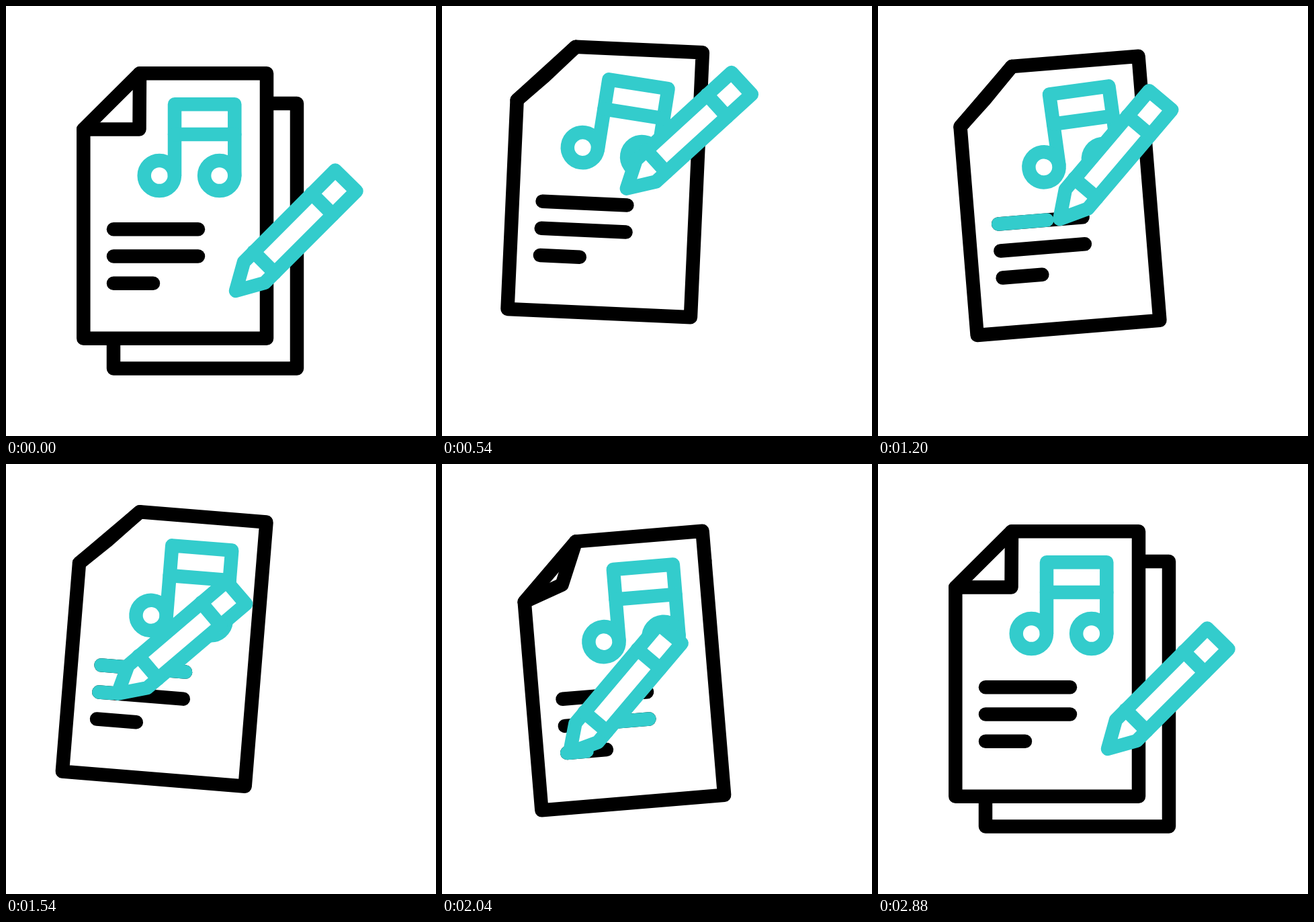
Animation of 640 by 640 pixels, one loop 3.34 s. Source, as an HTML page with a canvas:

```html
<!DOCTYPE html>
<html lang="en">
<head>
<meta charset="utf-8">
<title>Songwriting</title>
<style>
html, body { margin: 0; width: 100%; height: 100%; overflow: hidden; background: #fff; }
canvas { display: block; width: 640px; height: 640px; }
</style>
</head>
<body>
<canvas id="stage" width="640" height="640"></canvas>
<script>
const ctx = document.getElementById('stage').getContext('2d');
const LOOP = 3340, STEP = 20;
const INK = '#000', TEAL = '#33cccc', PAPER = '#fff';

const clamp = v => Math.max(0, Math.min(1, v));
const lerp = (a, b, k) => a + (b - a) * k;
const ease = k => (1 - Math.cos(Math.PI * clamp(k))) / 2;
const span = (t, from, to) => clamp((t - from) / (to - from));
const mix = (a, b, k) => a.map((v, i) => lerp(v, b[i], k));

// Eased value between [time, value] keys.
function track(t, keys) {
  if (t <= keys[0][0]) return keys[0][1];
  for (let i = 1; i < keys.length; i++) {
    const [t0, v0] = keys[i - 1], [t1, v1] = keys[i];
    if (t < t1) return lerp(v0, v1, ease((t - t0) / (t1 - t0)));
  }
  return keys[keys.length - 1][1];
}

function bezier(a, b, c, d, k) {
  const j = 1 - k;
  return a.map((v, i) =>
    j * j * j * v + 3 * j * j * k * b[i] + 3 * j * k * k * c[i] + k * k * k * d[i]);
}

function poly(points, color, closed, fill) {
  ctx.beginPath();
  points.forEach(p => ctx.lineTo(p[0], p[1]));
  if (closed) ctx.closePath();
  if (fill) { ctx.fillStyle = fill; ctx.fill(); }
  ctx.strokeStyle = color;
  ctx.stroke();
}

function arc(x, y, r, from, to, ccw) {
  ctx.beginPath();
  ctx.arc(x, y, r, from, to, ccw);
  ctx.strokeStyle = TEAL;
  ctx.stroke();
}

function rotateAbout(x, y, degrees) {
  ctx.translate(x, y);
  ctx.rotate(degrees * Math.PI / 180);
  ctx.translate(-x, -y);
}

const REST = [342, 424];
const LINES = [
  { y: 332.3, end: 286, draw: [955, 1380], wipe: [1620, 1820] },
  { y: 372.5, end: 286, draw: [1480, 1860], wipe: [1940, 2140] },
  { y: 412.7, end: 219, draw: [1960, 2120], wipe: [2180, 2340] }
];

const tilt = t => track(t, [[320, 0], [740, 4.85], [1160, -4.85], [1580, 4.85], [2000, -4.85], [2420, 0]]);
const lift = t => track(t, [[220, 0], [490, -40], [780, -1], [1060, -29], [1340, 0],
  [1640, -33], [1900, 5], [2080, 11.5], [2420, 0]]);
const noteTilt = t => track(t, [[220, 0], [500, 7], [780, -5.8], [1030, 6], [1280, -6], [1540, 0]]);

function penTip(t) {
  const [a, b, c] = LINES;
  const start = l => [160, l.y], end = l => [l.end, l.y];
  if (t < 880) return bezier(REST, [274, 254], [310, 312], start(a), ease(span(t, 220, 880)));
  if (t < 1320) return mix(start(a), end(a), span(t, 880, 1320));
  if (t < 1460) return mix(end(a), start(b), ease(span(t, 1320, 1460)));
  if (t < 1820) return mix(start(b), end(b), span(t, 1460, 1820));
  if (t < 2030) return mix(end(b), start(c), ease(span(t, 1820, 2030)));
  if (t < 2180) return mix(start(c), end(c), span(t, 2030, 2180));
  return bezier(end(c), [260, 665], [430, 645], REST, ease(span(t, 2180, 2880)));
}

// Swing mark: the head runs up the curve, then the tail follows.
function swingMark(t, begin, x, y, mirrored) {
  const head = ease(span(t, begin, begin + 180));
  const tail = ease(span(t, begin + 220, begin + 380));
  if (head <= tail) return;
  const angle = k => {
    const a = lerp(75, 180, k) * Math.PI / 180;
    return mirrored ? Math.PI - a : a;
  };
  arc(x, y, 105, angle(tail), angle(head), mirrored);
}

function pages(t) {
  const hide = track(t, [[220, 0], [430, 1], [2180, 1], [2420, 0]]);
  const fold = track(t, [[220, 0], [430, 1], [1940, 1], [2160, 0]]);
  const right = 433 - 61 * hide, bottom = 539.5 - 48 * hide;
  poly([[388, 145], [right, 145], [right, bottom], [160, bottom], [160, 494]], INK, false, PAPER);
  poly([[199, 100.3], [388, 100.3], [388, 494.7], [115.3, 494.7], [115.3, 183.5]], INK, true, PAPER);
  poly([[199, 100.3], mix([198.5, 183.5], [154, 147], fold), [115.3, 183.5]], INK);
}

function note(t) {
  ctx.save();
  rotateAbout(248, 142, noteTilt(t));
  poly([[251, 252.5], [251, 146.3], [340.3, 146.3], [340.3, 252.5]], TEAL);
  poly([[251, 191], [340.3, 191]], TEAL);
  arc(228.3, 252.5, 22.6, 0, 2 * Math.PI);
  arc(317.7, 252.5, 22.6, 0, 2 * Math.PI);
  ctx.restore();
}

function textLines(t) {
  for (const { y, end, draw, wipe } of LINES) {
    poly([[160, y], [end, y]], INK);
    const head = span(t, ...draw), tail = span(t, ...wipe);
    if (head > tail) poly([[lerp(160, end, tail), y], [lerp(160, end, head), y]], TEAL);
  }
}

function pencil(t) {
  const [x, y] = penTip(t);
  ctx.save();
  ctx.translate(x - REST[0], y - REST[1]);
  poly([REST, [354, 381], [490, 244.5], [521.5, 275.5], [385, 412]], TEAL, true, PAPER);
  poly([[455, 279], [486.5, 310.5]], TEAL);
  poly([[368.4, 365.7], [399.9, 397.2]], TEAL);
  ctx.restore();
}

function render(t) {
  ctx.fillStyle = PAPER;
  ctx.fillRect(0, 0, 640, 640);
  ctx.lineWidth = 20.5;
  ctx.lineCap = ctx.lineJoin = 'round';
  swingMark(t, 560, 137, 440, false);
  swingMark(t, 1620, 366, 442, true);
  ctx.save();
  ctx.translate(0, lift(t));
  rotateAbout(251.5, 100, tilt(t));
  pages(t);
  note(t);
  textLines(t);
  pencil(t);
  ctx.restore();
}

const began = performance.now();
function tick() {
  const t = (performance.now() - began) % LOOP;
  render(Math.floor(t / STEP) * STEP);
  requestAnimationFrame(tick);
}
tick();
</script>
</body>
</html>
```
